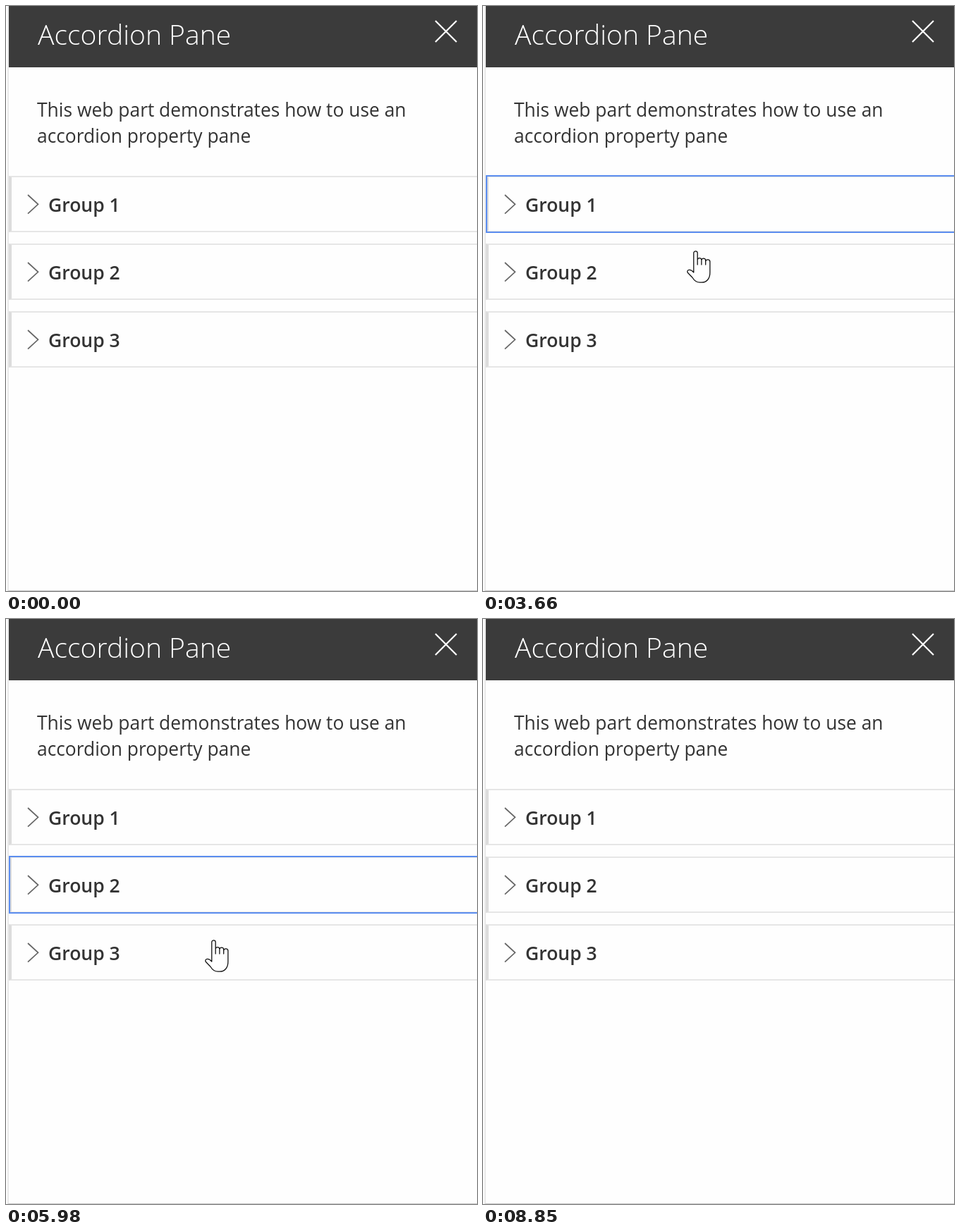
Recreate the animation shown at these times as an HTML page. Size 668 by 830 pixels, loop 9000 ms.

```html
<!DOCTYPE html>
<html lang="en">
<head>
<meta charset="utf-8">
<title>Accordion Pane</title>
<style>
  * { box-sizing: border-box; }
  html, body { margin: 0; width: 100%; height: 100%; overflow: hidden; background: #fefefe; }
  body { position: relative; font: 400 26.4px/37px "Open Sans", "Noto Sans", sans-serif; color: #333; }
  .pane { position: absolute; left: 2px; top: 0; width: 666px; height: 830px; overflow: hidden;
    border-left: 2px solid #e9e9e9; border-bottom: 1px solid #c8c8c8; }
  header { height: 87px; background: #3b3b3b; color: #fff; padding-left: 41px;
    font-weight: 300; font-size: 39.1px; line-height: 79px; white-space: pre; }
  .close { position: absolute; left: 604px; top: 20px; }
  .about { position: absolute; left: 40px; top: 129px; margin: 0; white-space: pre; }
  .groups { position: absolute; left: 0; right: 0; top: 241px; }
  .group { margin-bottom: 16px; }
  .head { position: relative; height: 80px; padding-left: 52px; white-space: pre;
    font-weight: 600; font-size: 26.5px; line-height: 79px;
    border: 2px solid #e6e6e6; border-left: 4px solid #dcdcdc; border-right: 0; }
  .head svg { position: absolute; left: -8px; top: -2px; }
  .focus .head::after { content: ""; position: absolute; left: -4px; right: -4px; top: -3px; bottom: -3px;
    border: 2px solid #5b8def; }
  .active .head { border-left-color: #858585; }
  .down, .open .right { display: none; }
  .open .down { display: inline; }
  .panel { display: none; height: 290px; padding: 27px 24px 0 40px; white-space: pre; }
  .open .panel { display: block; }
  .label { height: 46px; line-height: 40px; }
  .field { height: 64px; margin-bottom: 19px; border: 2px solid #a6a6a6; padding-left: 24px; line-height: 64px; }
  svg { fill: none; overflow: visible; }
  .cursor { position: absolute; left: -4px; top: 0; width: 1px; height: 1px; }
  .cursor path { fill: #fff; stroke: #111; stroke-width: 1.3; stroke-linejoin: round; }
  .cursor circle { fill: rgba(255, 255, 0, .47); }
</style>
</head>
<body>
<div class="pane">
  <header>Accordion Pane</header>
  <svg class="close" width="32" height="32" stroke="#fff" stroke-width="2.2"><path d="M1 1L31 31M31 1L1 31"/></svg>
  <p class="about">This web part demonstrates how to use an
accordion property pane</p>
  <div class="groups"></div>
  <svg class="cursor">
    <path id="hand" transform="translate(-13 0)" d="M9.8 30V3.5a2.7 2.7 0 0 1 5.4 0V20V13a2.9 2.9 0 0 1 5.7 0V20V14a2.9 2.9 0 0 1 5.8 0V20V16a3 3 0 0 1 6.2 0V31C33 40 28 45.2 21 45.2H18.5C13 45.2 10.2 42 7.8 38L1.5 31.5C0 29.5 1.2 27.4 3.6 27.4Q7 27.4 9.8 31Z"/>
    <path id="arrow" d="M0.8 1V33.5L8.3 26.4L13 37.2L17.6 35.2L12.9 24.6H23.4Z"/>
    <circle id="click" r="24"/>
  </svg>
</div>
<script>
const LOOP = 9000, STEP = 50, BLUR = 8850;
const ENTER = 1000, LEAVE = 8530;

// Each group is clicked twice: once to open it, once to close it
const clicks = [
  { group: 0, down: 1820, up: 1900 }, { group: 0, down: 3300, up: 3450 },
  { group: 1, down: 4320, up: 4450 }, { group: 1, down: 5320, up: 5470 },
  { group: 2, down: 6290, up: 6440 }, { group: 2, down: 7360, up: 7510 }
];

// The pointer's hot spot starts below the groups and eases to each stop
const origin = { x: 522, y: 761 };
const moves = [
  { from: ENTER, to: 1490, x: 313, y: 319 },
  { from: 1490, to: 1670, x: 304, y: 275 },
  { from: 3020, to: 3135, x: 303, y: 310 },
  { from: 3450, to: 4170, x: 300, y: 387 },
  { from: 5750, to: 6150, x: 293, y: 477 },
  { from: 7560, to: 7880, x: 303, y: 253 },
  { from: 7880, to: LEAVE, x: 545, y: 824 }
];

const $ = id => document.getElementById(id);
const show = (el, on) => { el.style.display = on ? "" : "none"; };
const easeOut = u => 1 - (1 - u) ** 2;

const property = (n, value) =>
  `<div class="label">Property ${n}</div><div class="field">${value}</div>`;

const list = document.querySelector(".groups");
list.innerHTML = [1, 2, 3].map(n => `<div class="group">
  <div class="head"><svg width="60" height="80" stroke="#666" stroke-width="1.7"><path class="right"
    d="M31 27L45.5 40.3L31 53.6"/><path class="down" d="M25 33L38 46.5L51 33"/></svg>Group ${n}</div>
  <div class="panel">${property(2 * n - 1, n === 1 ? "Accordion Pane" : "")}${property(2 * n, "")}</div>
</div>`).join("");
const rows = [...list.children];
const cursor = document.querySelector(".cursor");

function pointer(t) {
  let { x, y } = origin;
  for (const m of moves) {
    if (t < m.from) break;
    const held = Math.floor((t - m.from) / STEP) * STEP;
    const u = t >= m.to ? 1 : easeOut(held / (m.to - m.from));
    x += (m.x - x) * u;
    y += (m.y - y) * u;
  }
  return { x: Math.round(x), y: Math.round(y) };
}

function render(t) {
  const last = clicks.filter(c => t >= c.down).pop();
  const pressed = Boolean(last) && t < last.up;
  const { x, y } = pointer(t);
  let top = 241, overHead = false;

  rows.forEach((row, i) => {
    const open = clicks.filter(c => c.group === i && t >= c.up).length % 2 === 1;
    const focus = Boolean(last) && last.group === i && t < BLUR;
    row.classList.toggle("open", open);
    row.classList.toggle("focus", focus);
    row.classList.toggle("active", focus && pressed);
    overHead = overHead || (y >= top && y < top + 80);
    top += open ? 386 : 96;
  });

  cursor.style.transform = `translate(${x}px, ${y}px)`;
  show(cursor, t >= ENTER && t < LEAVE);
  show($("hand"), overHead);
  show($("arrow"), !overHead);
  show($("click"), pressed);
}

const start = performance.now();
function tick() {
  render((performance.now() - start) % LOOP);
  requestAnimationFrame(tick);
}
render(0);
requestAnimationFrame(tick);
</script>
</body>
</html>
```
